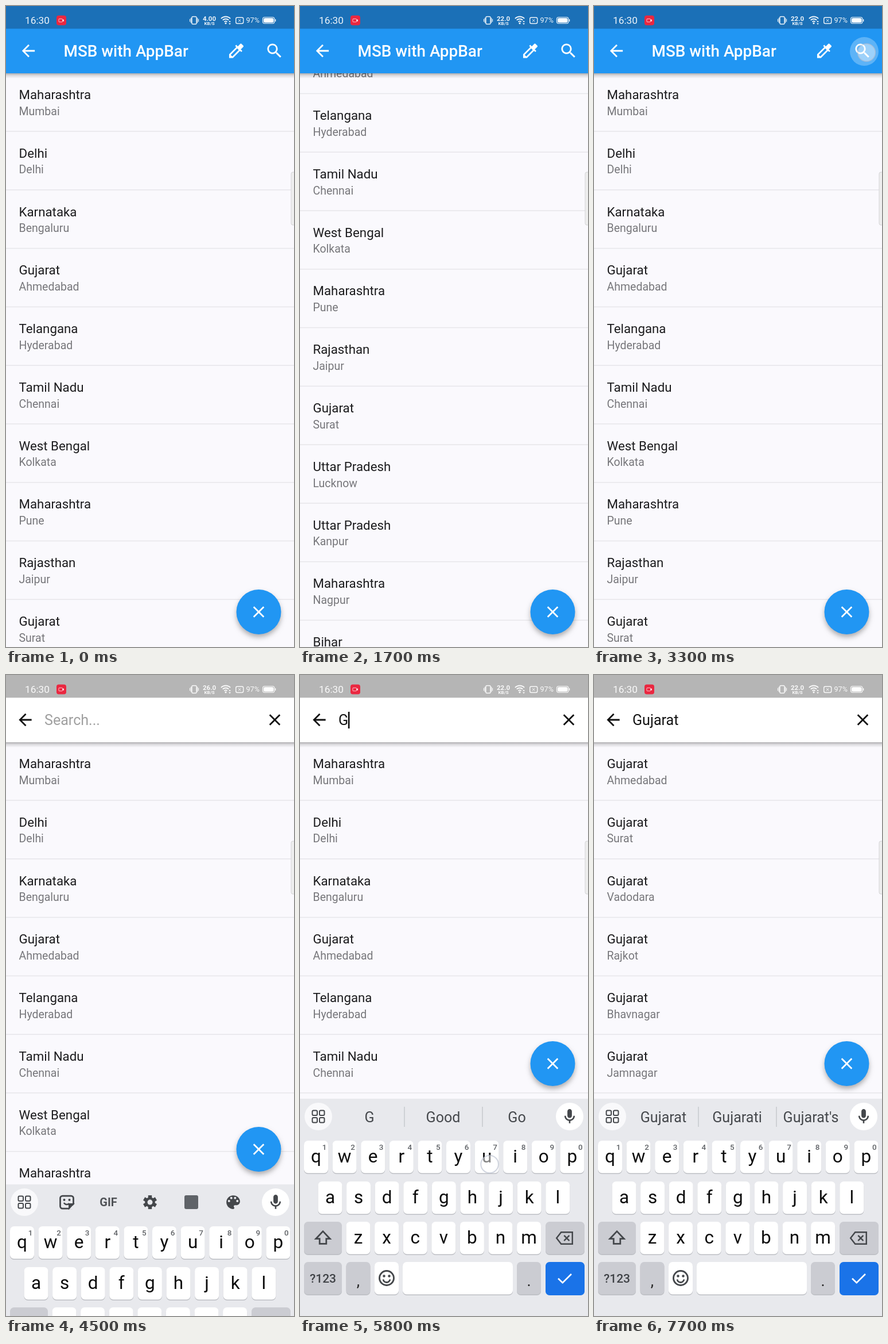
Recreate the animation shown at these times as an HTML page with a canvas. Size 502 by 1115 pixels, loop 8 s.

```html
<!DOCTYPE html>
<html lang="en">
<head>
<meta charset="utf-8">
<title>Search bar demo</title>
<style>
html, body { margin: 0; width: 100%; height: 100%; overflow: hidden; background: #faf9fd; }
canvas { display: block; width: 502px; height: 1115px; }
</style>
</head>
<body>
<canvas id="stage" width="502" height="1115"></canvas>
<script>
const ctx = document.getElementById('stage').getContext('2d');
const W = 502, H = 1115, LOOP = 8000, STEP = 100;
const BLUE = '#2196f3', PAPER = '#faf9fd', INK = '#1c1c1e', KEYS_BG = '#e8e9ed', DARK = '#44474b';
const ROW = 101.78, KB_HEIGHT = 378;

const CITIES = `Maharashtra/Mumbai,Delhi/Delhi,Karnataka/Bengaluru,Gujarat/Ahmedabad,Telangana/Hyderabad,
Tamil Nadu/Chennai,West Bengal/Kolkata,Maharashtra/Pune,Rajasthan/Jaipur,Gujarat/Surat,Uttar Pradesh/Lucknow,
Uttar Pradesh/Kanpur,Maharashtra/Nagpur,Bihar/Patna,Madhya Pradesh/Indore,Maharashtra/Thane,Madhya Pradesh/Bhopal`
  .split(',').map(s => s.trim().split('/'));
const MATCHES = ['Ahmedabad', 'Surat', 'Vadodara', 'Rajkot', 'Bhavnagar', 'Jamnagar', 'Gandhinagar']
  .map(city => ['Gujarat', city]);

const ICON = {
  back: 'M20 11H7.83l5.59-5.59L12 4l-8 8 8 8 1.41-1.41L7.83 13H20v-2z',
  close: 'M19 6.41L17.59 5 12 10.59 6.41 5 5 6.41 10.59 12 5 17.59 6.41 19 12 13.41 17.59 19 19 17.59 13.41 12z',
  search: 'M15.5 14h-.79l-.28-.27C15.41 12.59 16 11.11 16 9.5 16 5.91 13.09 3 9.5 3S3 5.91 3 9.5 5.91 16 9.5 16c1.61 0 3.09-.59 4.23-1.57l.27.28v.79l5 4.99L20.49 19l-4.99-5zm-6 0C7.01 14 5 11.99 5 9.5S7.01 5 9.5 5 14 7.01 14 9.5 11.99 14 9.5 14z',
  dropper: 'M20.71 5.63l-2.34-2.34c-.39-.39-1.02-.39-1.41 0l-3.12 3.12-1.93-1.91-1.41 1.41 1.42 1.42L3 16.25V21h4.75l8.92-8.92 1.42 1.42 1.41-1.41-1.92-1.92 3.12-3.12c.4-.4.4-1.03.01-1.42zM6.92 19L5 17.08l8.06-8.06 1.92 1.92L6.92 19z',
  mic: 'M12 14c1.66 0 3-1.34 3-3V5c0-1.66-1.34-3-3-3S9 3.34 9 5v6c0 1.66 1.34 3 3 3zm5-3c0 2.76-2.24 5-5 5s-5-2.24-5-5H5c0 3.53 2.61 6.43 6 6.92V21h2v-3.08c3.39-.49 6-3.39 6-6.92h-2z',
  palette: 'M12 3c-4.97 0-9 4.03-9 9s4.03 9 9 9c.83 0 1.5-.67 1.5-1.5 0-.39-.15-.74-.39-1.01-.23-.26-.38-.61-.38-.99 0-.83.67-1.5 1.5-1.5H16c2.76 0 5-2.24 5-5 0-4.42-4.03-8-9-8z',
  shift: 'M12 3.5L3.5 12.5H8V18.5H16V12.5H20.5Z',
  erase: 'M8 5H21.5V19H8L2.5 12ZM11.5 8.8L17.8 15.2M17.8 8.8L11.5 15.2',
  check: 'M3.5 12.5L9.2 18L20.5 6.8'
};
for (const k in ICON) ICON[k] = new Path2D(ICON[k]);

// [tap time, key]; the first tap is the shift key
const TAPS = [[5080, 'shift'], [5520, 'g'], [5790, 'u'], [6000, 'j'], [6230, 'a'], [6460, 'r'], [6800, 'a'], [7130, 't']];
const COMMIT = 30, FILTER_AT = 7280, FOCUS_AT = 4640;
const SUGGEST = [
  ['G', 'Good', 'Go'], ['Gu', 'Guy', 'Guys'], ['Guj', 'Gujarat', 'Gujarati'], ['Guja', 'Gujarat', 'Gujarati'],
  ['Gujar', 'Gujarat', 'Gujarati'], ['Gujara', 'Gujarat', 'Gujarati'], ['Gujarat', 'Gujarati', "Gujarat's"]
];
const LETTERS = ['qwertyuiop', 'asdfghjkl', 'zxcvbnm'];
const ROW_X = [7, 31.5, 80.5], ROW_Y = [810, 881, 951, 1021], PITCH = 49.6;

const clamp = v => Math.max(0, Math.min(1, v));
const span = (t, a, b) => clamp((t - a) / (b - a));
const ease = p => p * p * (3 - 2 * p);

// Smooth curve through samples spaced 100 ms apart
const SCROLL = [0, 0, 95, 235, 371, 436, 456, 448, 350, 207.5, 78, 14, 0, 0];
function scrollAt(t) {
  const u = (t - 1300) / 100, i = Math.floor(u), f = u - i;
  if (i < 0 || i >= SCROLL.length - 1) return 0;
  const at = k => SCROLL[k] || 0;
  const a = at(i - 1), b = at(i), c = at(i + 1), d = at(i + 2);
  return Math.max(0, b + f / 2 * (c - a + f * (2 * a - 5 * b + 4 * c - d + f * (3 * (b - c) + d - a))));
}

function text(s, x, y, size, color, weight = 400, align = 'left') {
  ctx.font = `${weight} ${size}px Roboto, sans-serif`;
  ctx.textAlign = align;
  ctx.fillStyle = color;
  ctx.fillText(s, x, y);
}
function rect(x, y, w, h, color) {
  ctx.fillStyle = color;
  ctx.fillRect(x, y, w, h);
}
function round(x, y, w, h, r, fill, stroke, line = 1.5) {
  ctx.beginPath();
  ctx.roundRect(x, y, w, h, r);
  if (fill) { ctx.fillStyle = fill; ctx.fill(); }
  if (stroke) { ctx.strokeStyle = stroke; ctx.lineWidth = line; ctx.stroke(); }
}
function disc(x, y, r, fill, stroke, line = 2) {
  round(x - r, y - r, 2 * r, 2 * r, r, fill, stroke, line);
}
function arc(x, y, r, a, b, color, line) {
  ctx.beginPath();
  ctx.arc(x, y, r, a, b);
  ctx.strokeStyle = color;
  ctx.lineWidth = line;
  ctx.stroke();
}
function icon(name, x, y, color, { scale = 1.395, line = 0 } = {}) {
  ctx.save();
  ctx.translate(x, y);
  ctx.scale(scale, scale);
  ctx.translate(-12, -12);
  ctx.fillStyle = ctx.strokeStyle = color;
  ctx.lineWidth = line;
  if (line) ctx.stroke(ICON[name]); else ctx.fill(ICON[name]);
  ctx.restore();
}
function shadow(color, blur, dy) {
  ctx.shadowColor = color;
  ctx.shadowBlur = blur;
  ctx.shadowOffsetY = dy;
}

function drawStatus(t, searching) {
  const c = 'rgba(255,255,255,.92)';
  rect(0, 0, W, 39.5, searching ? '#b5b5b5' : '#1b70b7');
  text('16:30', 33, 31, 17.3, c);
  round(88, 16.5, 17, 17, 4, '#ea2740');
  round(92, 22.3, 6.5, 5.5, 1, null, '#ffd5da', .9);
  rect(99, 23.5, 2, 3.2, '#ffd5da');

  round(324, 18.5, 8, 13, 1.5, null, c, 1.4);
  for (const [x, h] of [[320.2, 5], [322.2, 9], [333.2, 9], [335.2, 5]]) rect(x - .3, 25 - h / 2, 1.2, h, c);

  const speed = t < 700 ? '4.00' : t >= 4000 && t < 5600 ? '26.0' : '22.0';
  text(speed, 354.5, 25.5, 11.5, c, 700, 'center');
  text('KB/S', 354.5, 33, 8, c, 700, 'center');

  for (const r of [3.5, 7.5, 11.5]) arc(383, 30, r, Math.PI * 1.25, Math.PI * 1.75, c, 1.8);
  disc(383, 30, 1.6, c);
  for (const d of [-1, 1]) {
    ctx.beginPath();
    ctx.moveTo(388, 29 + d);
    ctx.lineTo(392, 29 + d);
    ctx.lineTo(390, 29 + d * 3.5);
    ctx.fillStyle = c;
    ctx.fill();
  }
  round(400.7, 20, 13, 10.5, 2.5, null, c, 1.4);
  icon('close', 407.2, 25.2, c, { scale: .36 });
  text('97%', 418.5, 29.3, 12.6, c);
  round(447.5, 19.5, 20.5, 11, 3.5, null, c, 1.2);
  round(449, 21, 17.5, 8, 2.5, '#fff');
  rect(469, 23, 1.3, 4, c);
}

function drawList(t) {
  const rows = t < FILTER_AT ? CITIES : MATCHES, off = scrollAt(t);
  rows.forEach(([state, city], i) => {
    const y = i * ROW - off;
    if (y > H || y < -ROW) return;
    text(state, 22.5, 162 + y, 22.3, INK);
    text(city, 22.5, 189.7 + y, 19.5, '#77777b');
    rect(0, 217.3 + y, W, 1.5, '#e7e6ea');
  });
  round(497, 289, 9, 92, 3, '#eeeeee', '#d4d4d6', 1);
}

function drawBar(color) {
  const g = ctx.createLinearGradient(0, 117, 0, 126);
  g.addColorStop(0, 'rgba(0,0,0,.31)');
  g.addColorStop(.4, 'rgba(0,0,0,.13)');
  g.addColorStop(1, 'rgba(0,0,0,0)');
  rect(0, 117, W, 9, g);
  rect(0, 39, W, 78, color);
}

function drawTitleBar(t) {
  drawBar(BLUE);
  icon('back', 39, 78, '#fff');
  text('MSB with AppBar', 100.5, 88.3, 27.9, '#fff', 500);
  icon('dropper', 401.5, 78, '#fff');
  icon('search', 468, 78, '#fff');
  const p = span(t, 3160, 3300);
  if (p > 0 && t < 3600) disc(471, 79, 12 + 13 * ease(p), 'rgba(255,255,255,.27)');
}

function typedCount(t) {
  return TAPS.filter(([at], i) => i && t >= at + COMMIT).length;
}

function drawSearchBar(t) {
  const p = span(t, 3330, 3600);
  if (!p) return;
  ctx.save();
  ctx.beginPath();
  if (p < 1) {
    ctx.rect(0, 39, W, 78);
    ctx.clip();
    ctx.beginPath();
    ctx.arc(468, 78, 480 * ease(p), 0, 7);
  } else ctx.rect(0, 39, W, 90);
  ctx.clip();
  rect(0, 39, W, 78, '#fff');
  icon('back', 33.5, 78, '#111');
  icon('close', 468.5, 78, '#111');
  const n = typedCount(t), typed = 'Gujarat'.slice(0, n);
  text(typed || 'Search...', 67, 87, 25.1, n ? '#141414' : '#a0a0a0');
  const since = t - (n ? TAPS[n][0] + COMMIT : FOCUS_AT);
  if (since >= 0 && since % 1000 < 500) {
    const x = 67 + (n ? ctx.measureText(typed).width : 0);
    rect(x - .3, 64, 2.7, 29, '#111');
  }
  ctx.restore();
}

function drawFab(lift) {
  const y = 1054 - lift;
  ctx.save();
  shadow('rgba(0,0,0,.3)', 9, 5);
  disc(440.5, y, 39, BLUE);
  ctx.restore();
  icon('close', 440.5, y, '#fff');
}

function key(x, y, w, color = '#fff', edge = '#bcbec3') {
  round(x, y + 1.5, w, 56.5, 7, edge);
  round(x, y, w, 56.5, 7, color);
}

function drawTools() {
  round(94.5, 757, 23, 22, 4, null, DARK, 2.8);
  ctx.beginPath();
  ctx.moveTo(119.5, 771);
  ctx.lineTo(119.5, 780.8);
  ctx.lineTo(109.5, 780.8);
  ctx.fillStyle = KEYS_BG;
  ctx.fill();
  ctx.beginPath();
  ctx.moveTo(117.5, 771);
  ctx.lineTo(110, 771);
  ctx.lineTo(110, 779);
  ctx.closePath();
  ctx.fillStyle = ctx.strokeStyle = DARK;
  ctx.lineWidth = 2;
  ctx.fill();
  ctx.stroke();
  disc(101.5, 764, 2, DARK);
  disc(110.5, 764, 2, DARK);
  arc(106, 766.5, 5.5, .7, 2.7, DARK, 2.4);

  text('GIF', 178.5, 775, 20, '#505357', 700, 'center');

  ctx.fillStyle = DARK;
  for (let i = 0; i < 6; i++) {
    ctx.save();
    ctx.translate(251, 768);
    ctx.rotate(i * Math.PI / 3);
    ctx.fillRect(-3.2, -12, 6.4, 8);
    ctx.restore();
  }
  disc(251, 768, 8.8, DARK);
  disc(251, 768, 4.5, KEYS_BG);

  round(311, 756, 24, 24, 3, '#5f6368');

  icon('palette', 396, 768, DARK, { scale: 1.32 });
  for (const [x, y] of [[-5.5, -1.5], [-2.5, -5.5], [2.5, -5.5], [5.5, -1.5]])
    disc(396 + x * 1.32, 768 + y * 1.32, 2, KEYS_BG);
}

function drawKeyboard(t, lift) {
  if (!lift) return;
  ctx.save();
  ctx.translate(0, KB_HEIGHT - lift);
  rect(0, 737, W, KB_HEIGHT, KEYS_BG);

  const n = typedCount(t), upper = t >= TAPS[0][0] - 20 && n === 0;
  disc(32, 768, 24, '#f9f9fb');
  for (const x of [21.5, 34]) for (const y of [757.5, 770]) round(x, y, 8.5, 8.5, 2, null, DARK, 2);
  disc(470, 768, 24, '#fff');
  icon('mic', 470, 768, DARK, { scale: 1.3 });
  if (n) {
    SUGGEST[n - 1].forEach((s, i) => text(s, [121, 249.5, 378][i], 777.5, 25.1, '#45484c', 400, 'center'));
    rect(181.3, 751, 1.4, 35, '#c4c6ca');
    rect(317.3, 751, 1.4, 35, '#c4c6ca');
  } else drawTools();

  LETTERS.forEach((row, r) => [...row].forEach((ch, i) => {
    const x = ROW_X[r] + i * PITCH, y = ROW_Y[r];
    key(x, y, 42);
    text(upper ? ch.toUpperCase() : ch, x + 21, y + (upper ? 40 : 38), 31.5, '#0c0c0c', 400, 'center');
    if (!r) text((i + 1) % 10, x + 35.5, y + 15.5, 13.5, '#606367', 500, 'center');
  }));

  const gray = '#cbccd2', y3 = ROW_Y[2], y4 = ROW_Y[3];
  key(7, y3, 66, upper ? '#b9bbc0' : gray);
  icon('shift', 40, 980, DARK, { scale: 1.45, line: upper ? 0 : 1.9 });
  key(428, y3, 68, gray);
  icon('erase', 461, 979.5, DARK, { scale: 1.45, line: 1.7 });
  key(7, y4, 66, gray);
  text('?123', 40, 1057, 21, '#3f4246', 500, 'center');
  key(80.5, y4, 42, gray);
  text(',', 101.5, 1063, 27, '#222', 400, 'center');
  key(130, y4, 42);
  disc(151, 1049, 12.5, null, DARK, 2.9);
  disc(146.5, 1045.5, 2.2, DARK);
  disc(155.5, 1045.5, 2.2, DARK);
  arc(151, 1050.5, 6, .15, Math.PI - .15, DARK, 2.8);
  key(179, y4, 192);
  key(378, y4, 42, gray);
  text('.', 399, 1063, 27, '#222', 400, 'center');
  key(428, y4, 68, '#1a73e8', '#1a73e8');
  icon('check', 461.5, 1049, '#fff', { scale: 1.35, line: 2 });
  ctx.restore();
}

function touch(x, y, alpha) {
  if (alpha <= 0) return;
  ctx.save();
  ctx.globalAlpha = alpha;
  disc(x, y, 15.3, 'rgba(255,255,255,.5)', 'rgba(184,191,206,.65)', 2);
  ctx.restore();
}
const fade = (t, a, b) => span(t, a, a + 30) * (1 - span(t, b - 40, b));

function keyCenter(k) {
  if (k === 'shift') return [43, 972];
  const r = LETTERS.findIndex(row => row.includes(k));
  return [ROW_X[r] + LETTERS[r].indexOf(k) * PITCH + 26, ROW_Y[r] + 41];
}

function drawTouches(t) {
  touch(310, 850 - scrollAt(t), fade(t, 1370, 1640));
  touch(297, 858 - (scrollAt(t) - 207.5), fade(t, 1980, 2280));
  touch(475, 81, .8 * fade(t, 3160, 3390));
  touch(250, 82, fade(t, 4290, 4430));
  for (const [at, k] of TAPS) touch(...keyCenter(k), fade(t, at - 60, at + 64));
}

function draw(t) {
  const lift = KB_HEIGHT * (1 - Math.pow(1 - span(t, 4420, 4720), 3));
  rect(0, 0, W, H, PAPER);
  drawList(t);
  if (t < 3600) drawTitleBar(t); else drawBar('#fff');
  drawSearchBar(t);
  drawStatus(t, t >= 3400);
  drawFab(lift);
  drawKeyboard(t, lift);
  drawTouches(t);
}

const start = performance.now();
function tick() {
  const t = (performance.now() - start) % LOOP;
  draw(Math.floor(t / STEP) * STEP);
  requestAnimationFrame(tick);
}
tick();
</script>
</body>
</html>
```
